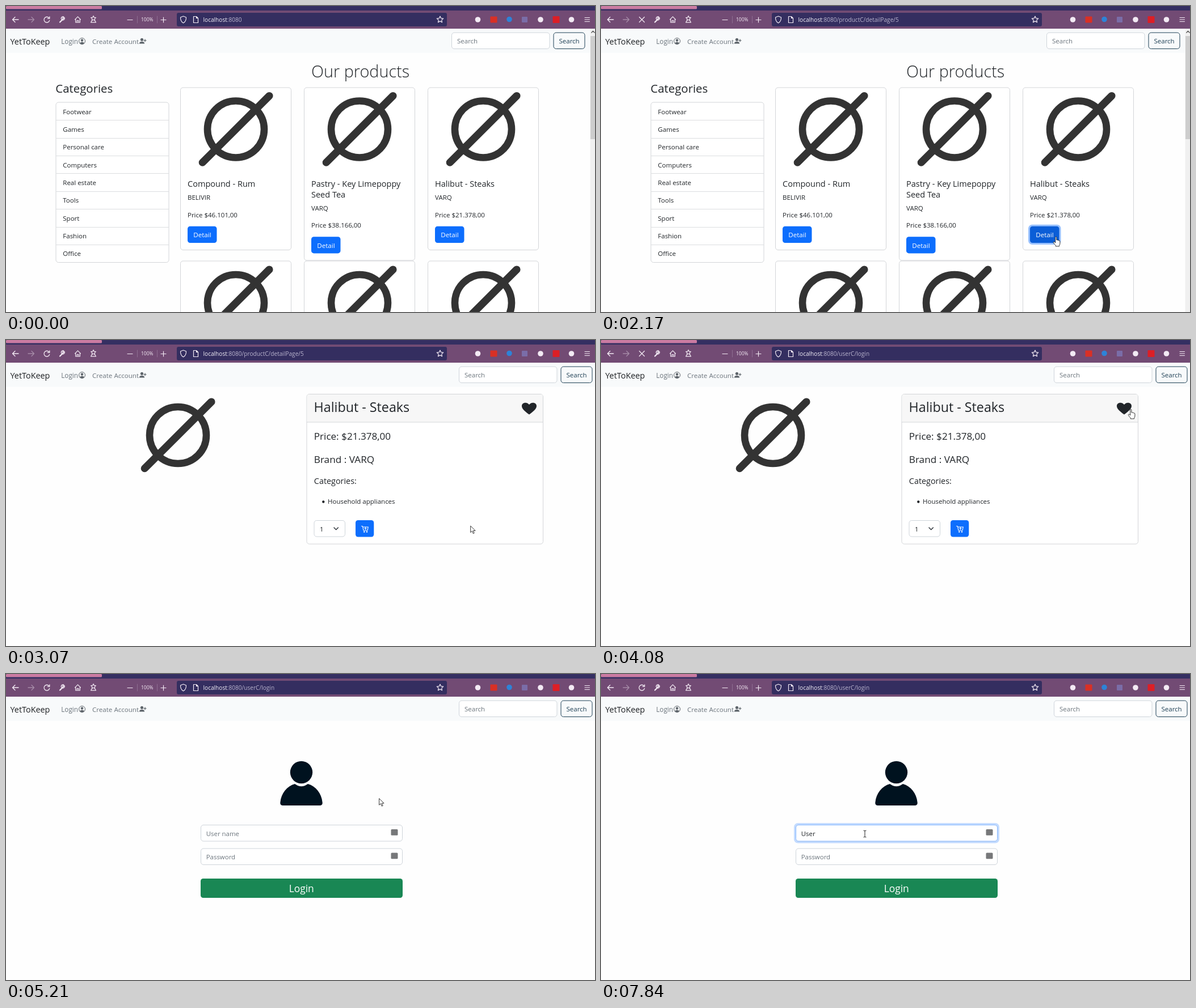
An HTML page that plays this animation: 1038x540 px, repeating every 8000 ms.

```html
<!DOCTYPE html>
<html lang="en">
<head>
<meta charset="utf-8">
<title>Shop walkthrough</title>
<style>
  html, body { margin: 0; width: 100%; height: 100%; overflow: hidden; background: #fefefe; }
  svg { display: block; width: 100%; height: 100%; }
  text { font-family: "Open Sans", "Noto Sans", sans-serif; white-space: pre; }
</style>
</head>
<body>
<svg id="stage" viewBox="0 0 1038 540" xmlns="http://www.w3.org/2000/svg"></svg>
<script>
const LOOP = 8000, INK = '#212529', GREY = '#6c757d', BLUE = '#0d6efd', LINE = '#d3d5d8';
const BRAND = 'YetToKeep', MAKER = 'VARQ';

const text = (x, y, s, size = 11.5, fill = INK, more = '') =>
  `<text x="${x}" y="${y}" font-size="${size}" fill="${fill}" ${more}>${s}</text>`;
const rect = (x, y, w, h, fill, r = 0, more = '') =>
  `<rect x="${x}" y="${y}" width="${w}" height="${h}" rx="${r}" fill="${fill}" ${more}/>`;
const box = (x, y, w, h, fill = '#fff', stroke = LINE, r = 4.5) =>
  rect(x + .5, y + .5, w - 1, h - 1, fill, r, `stroke="${stroke}"`);
const disc = (x, y, r, fill) => `<circle cx="${x}" cy="${y}" r="${r}" fill="${fill}"/>`;
const path = (d, stroke, w = 1.2, more = '') =>
  `<path d="${d}" fill="none" stroke="${stroke}" stroke-width="${w}" stroke-linecap="round" stroke-linejoin="round" ${more}/>`;
const group = (id, body, more = '') => `<g id="${id}" ${more}>${body}</g>`;
const move = (x, y, body) => `<g transform="translate(${x} ${y})">${body}</g>`;

const star = (x, y, r) => 'M' + Array.from({ length: 10 }, (_, i) => {
  const a = -Math.PI / 2 + i * Math.PI / 5, k = i % 2 ? r * .48 : r;
  return (x + k * Math.cos(a)).toFixed(2) + ' ' + (y + k * Math.sin(a)).toFixed(2);
}).join('L') + 'Z';

const emptySet = (x, y) => move(x, y,
  '<circle r="50" fill="none" stroke="#333" stroke-width="12.6"/>' +
  path('M-58.7 58.7L59 -59', '#333', 13.2));

function browser() {
  const c = '#f3eaf4';
  return rect(0, 0, 1038, 8, '#352f62') + rect(0, 0, 169, 5.5, '#cb7ba2', 1.5) +
    group('burst', '<ellipse cx="13" cy="-2" rx="13" ry="8" fill="#5d4a5e"/>') +
    rect(0, 8, 1038, 32, '#724b74') + rect(301, 12, 476, 24, '#342e60', 3) +
    path('M22 24H12M16 19.5L11.5 24L16 28.5', c, 1.3) +
    path('M39 24H49M45 19.5L49.5 24L45 28.5', c, 1.3, 'opacity=".4"') +
    group('reload', path('M75.5 20.8A4.9 4.9 0 1 0 76.7 25.3M76.8 18.8V22.2H73.2', c, 1.3)) +
    group('stop', path('M67.5 19.5L76.5 28.5M76.5 19.5L67.5 28.5', c, 1.3)) +
    path('M95 28.5L100 23.5', c, 2.2) + path('M103 20.5L101 22.5L99.8 21.3L101.8 19.2A3 3 0 1 0 103 20.5', c, 1.4) +
    path('M121.5 23.8L126.5 18.8L131.5 23.8M122.7 23V29H130.3V23M125.2 29V25.5H127.8V29', c) +
    path(star(154, 22, 4.6), c) + path('M149.5 28.8H158.5M151 26.5L149.5 28.8M157 26.5L158.5 28.8', c) +
    path('M214 24.5H223M273 24.5H282M277.5 20V29', c) +
    path('M231.5 18V30M266.5 18V30', '#96779a', .8) +
    text(238, 27.4, '100%', 8.5, c) +
    path('M312.5 18L317.5 20C317.7 25 316 28 312.5 30C309 28 307.300 25 307.500 20Z', c) +
    path('M330.500 18.500H335.500L338.500 21.500V29.500H330.500ZM335.500 18.500V21.500H338.500', c) +
    `<text x="347.5" y="27.8" font-size="10.1" fill="#f4f1f8">localhost<tspan fill="#b9b4cd" id="url"></tspan></text>` +
    path(star(765, 24, 6), c) +
    disc(831.5, 24, 4.8, c) + rect(853.5, 18.5, 12, 11, '#d93025', 1) + disc(887, 23.5, 4.8, '#2d83d8') +
    rect(909, 19, 10, 10, '#7a6da8', 1) + disc(942, 24, 4.8, c) + rect(963.5, 18, 12, 12, '#dc1f26', 1) +
    disc(996.5, 24, 4.8, c) +
    path('M1020 20.500H1028.500M1020 24H1028.500M1020 27.500H1028.500', c, 1.1);
}

function navbar() {
  const search = box(785, 46.5, 173.5, 29.500, '#fff', '#ced4da') + text(795, 66.3, 'Search', 11.5, GREY) +
    box(964.5, 46.5, 56, 29.500, 'none', '#1d3f54') + text(974.5, 66.3, 'Search', 11.5, '#1d3f54');
  return rect(0, 40, 1038, 42.5, '#f8fafb') +
    text(7.5, 68, BRAND, 14.4, '#1c1f22') +
    text(97.3, 66.500, 'Login', 11.7, GREY) + text(152, 66.500, 'Create Account', 11.6, GREY) +
    '<circle cx="134" cy="62" r="5.5" fill="none" stroke="#5f666c"/>' + disc(134, 60.500, 2.2, '#5f666c') +
    '<path d="M129.700 65.500Q134 61.500 138.300 65.500Q134 69.500 129.700 65.500Z" fill="#5f666c"/>' +
    disc(239.500, 59.300, 2.600, '#5f666c') + '<path d="M234.800 66.500Q235 62.700 239.500 62.700Q244 62.700 244.200 66.500Z" fill="#5f666c"/>' +
    path('M243 60.800H247M245 58.800V62.800', '#5f666c') +
    group('search', search);
}

const button = (x, y, id = '') => (id ? group(id + 'Ring', rect(x - 3, y - 3, 57.5, 35.2, '#98c1fe', 7)) : '') +
  rect(x, y, 51.5, 29.2, BLUE, 4.5, id && `id="${id}"`) + text(x + 10.3, y + 19.6, 'Detail', 11.6, '#fff');

function card(x, y, title, maker, price, id) {
  const drop = (title.length - 1) * 18.4, h = 287.5 + drop;
  return box(x, y, 196, h) + emptySet(x + 98, y + 74) +
    title.map((s, i) => text(x + 13, y + 175.800 + i * 18.400, s, 14.500)).join('') +
    text(x + 13, y + 198.7 + drop, maker) + text(x + 13, y + 229.500 + drop, 'Price ' + price) +
    button(x + 13, y + 245.3 + drop, id);
}

function shopPage() {
  const kinds = ['Footwear', 'Games', 'Personal care', 'Computers', 'Real estate', 'Tools', 'Sport', 'Fashion', 'Office'];
  const row = 31.36;
  return text(538, 126, 'Our products', 28.8, INK, 'font-weight="300"') +
    text(87.300, 153, 'Categories', 20.4) + box(87.5, 169.500, 200, 283.500) +
    kinds.map((s, i) => (i ? rect(88, Math.round(170 + i * row), 199, 1, '#dcdee0') : '') +
      text(100.3, 190.500 + i * row, s)).join('') +
    card(307, 143.500, ['Compound - Rum'], 'BELIVIR', '$46.101,00') +
    card(525, 143.500, ['Pastry - Key Limepoppy', 'Seed Tea'], MAKER, '$38.166,00') +
    card(743, 143.500, ['Halibut - Steaks'], MAKER, '$21.378,00', 'pick') +
    [307, 525, 743].map(x => box(x, 449.5, 196, 300) + emptySet(x + 98, 524)).join('') +
    rect(1029.5, 40, 8.5, 500, '#f0f0f0') + rect(1030, 53, 8, 182, '#cdcdcd') +
    path('M1031.800 47L1034.500 44.300L1037.200 47', '#555', 1.3);
}

function detailPage() {
  return emptySet(303, 168) + box(529.5, 95, 417.5, 265.500) +
    '<path d="M530.500 144.500V99.500Q530.500 96 534 96H942.500Q946 96 946 99.500V144.500Z" fill="#f7f7f7"/>' +
    rect(530, 144.500, 416.500, 1, LINE) +
    text(542.500, 127, 'Halibut - Steaks', 23.3) +
    '<path d="M922 131.500C913 125 909 121 909 116.500C909 110 918 108.500 922 114C926 108.500 935 110 935 116.500C935 121 931 125 922 131.500Z" fill="#212529"/>' +
    text(542.800, 176, 'Price: $21.378,00', 17.1) + text(542.800, 216.500, 'Brand : ' + MAKER, 17.2) +
    text(542.800, 254, 'Categories:', 14.4) + disc(559.300, 285.500, 2.2, INK) +
    text(567, 289.300, 'Household appliances') +
    box(542.5, 318, 55.5, 29.500, '#fff', '#ced4da') + text(553, 337.500, '1') +
    path('M578 331L581.700 334.700L585.400 331', '#343a40', 1.5) +
    rect(616, 318, 32.300, 29.500, BLUE, 4.5) +
    path('M626.500 328.500H628.300L630 336H637L638.300 330H629M633.500 330.800V334.300M631.800 332.500H635.200', '#fff', 1.1) +
    disc(631.300, 338.500, 1.2, '#fff') + disc(636, 338.500, 1.2, '#fff');
}

function loginPage() {
  const field = y => box(343, y, 356, 29.500, '#fff', '#ced4da');
  return disc(520.5, 173.5, 19.7, '#00121f') +
    '<path d="M488 232Q483 232 483.300 227C485 210 495 198 509 194Q520.500 202.500 532 194C546 198 556 210 557.700 227Q558 232 553 232Z" fill="#00121f"/>' +
    group('focusRing', rect(340, 263, 362, 35.5, '#c3dbff', 7)) +
    field(266) + field(307.500) + group('focusEdge', box(343, 266, 356, 29.500, '#fff', '#86b7fe')) +
    group('marks', rect(678.500, 274, 12, 10.800, '#77787a', 1.500) + rect(678.500, 315.500, 12, 10.800, '#77787a', 1.500)) +
    text(352.700, 285.800, 'User name', 11.45, GREY, 'id="entry"') +
    rect(353, 274, 1, 15, '#222', 0, 'id="caret"') +
    text(352.700, 327.300, 'Password', 11.45, GREY) +
    rect(343, 361, 356, 34, '#198754', 4.5) + text(520.7, 384.800, 'Login', 17.4, '#fff', 'text-anchor="middle"');
}

function pointers() {
  return group('arrow', '<path d="M.5 .5V12L3.300 9.500L5.100 14L7 13.200L5.200 8.900H9Z" fill="#fff" stroke="#222" stroke-width=".9"/>') +
    group('hand', '<path d="M.700 9V1.500Q.800 .200 1.800 .300Q2.900 .400 2.900 1.500V6Q4.500 5.200 5 6.400Q6.500 5.900 7 7Q8.900 6.700 8.900 8.500V12Q8.900 14 7.600 15.500V17H1.200V15.500Q-1 13.500 -2.700 10.500Q-3 8.900 -1.500 8.900Q-.200 9.200 .700 11Z" fill="#fff" stroke="#222" stroke-width=".9"/>') +
    group('beam', path('M-2 -5.800Q0 -5.800 0 -4.800Q0 -5.800 2 -5.800M0 -5V5M-2 6Q0 6 0 5Q0 6 2 6', '#222', 1));
}

document.getElementById('stage').innerHTML =
  rect(0, 0, 1038, 540, '#fefefe') + browser() + navbar() +
  group('shop', shopPage()) + group('detail', detailPage()) + group('login', loginPage()) +
  group('pointer', pointers());

const ui = {};
document.querySelectorAll('[id]').forEach(el => ui[el.id] = el);

const show = (el, on) => el.setAttribute('display', on ? 'inline' : 'none');
const fade = (el, v) => el.setAttribute('opacity', v);
const within = (t, a, b) => t >= a && t < b;
const ramp = (t, a, b) => Math.max(0, Math.min(1, (t - a) / (b - a)));
const latest = (steps, t) => steps.filter(s => s[0] <= t).pop()[1];

const track = [[590, 978, 518], [760, 936, 486], [1000, 874, 444], [1350, 814, 418], [1440, 812, 416],
  [1640, 800, 407], [2780, 800, 407], [3070, 818, 328], [3300, 870, 232], [3620, 937, 126],
  [3890, 932, 122], [4870, 932, 122], [5080, 800, 165], [5300, 560, 256], [5490, 465, 282]];
const urls = [[0, ''], [2100, '/productC/detailPage/5'], [4080, '/userC/login']];
const typed = [[0, ''], [7040, 'U'], [7370, 'Us'], [7500, 'Use'], [7700, 'User']];
const blink = [[0, 0], [5700, 1], [6240, 0], [6700, 1], [7230, 0], [7370, 1], [7840, 0]];

function pointerAt(t) {
  const i = track.findIndex(k => k[0] > t);
  if (i < 0) return track[track.length - 1].slice(1);
  if (!i) return track[0].slice(1);
  const [a, b] = [track[i - 1], track[i]], p = ramp(t, a[0], b[0]);
  return [a[1] + (b[1] - a[1]) * p, a[2] + (b[2] - a[2]) * p];
}

function draw(t) {
  const page = t < 2240 ? 'shop' : t < 4220 ? 'detail' : 'login';
  ['shop', 'detail', 'login'].forEach(id => show(ui[id], id === page));
  ui.search.setAttribute('transform', `translate(${page === 'shop' ? 0 : 13} 0)`);
  ui.url.textContent = ':8080' + latest(urls, t);

  const loading = within(t, 2100, 2570) || within(t, 4080, 4810);
  show(ui.stop, loading);
  show(ui.reload, !loading);
  fade(ui.stop, within(t, 2240, 2570) || within(t, 4220, 4810) ? .45 : 1);
  fade(ui.reload, within(t, 2570, 2850) || within(t, 4810, 5000) ? .45 : 1);
  show(ui.burst, within(t, 2310, 2500) || within(t, 4400, 4620));

  const [x, y] = pointerAt(t);
  const overButton = page === 'shop' && x < 807.5, overHeart = page === 'detail' && x > 908 && y < 132;
  const shape = overButton || overHeart ? 'hand' : page === 'login' && y > 266 ? 'beam' : 'arrow';
  show(ui.pointer, t >= 590);
  ui.pointer.setAttribute('transform', `translate(${x.toFixed(1)} ${y.toFixed(1)})`);
  ['arrow', 'hand', 'beam'].forEach(id => show(ui[id], id === shape));
  ui.pick.setAttribute('fill', overButton ? '#0b5ed7' : BLUE);
  fade(ui.pickRing, ramp(t, 1850, 2000));

  const focus = ramp(t, 5630, 5790);
  fade(ui.focusRing, focus);
  fade(ui.focusEdge, focus);
  show(ui.marks, t >= 4700);

  const value = latest(typed, t);
  ui.entry.textContent = value || 'User name';
  ui.entry.setAttribute('fill', value ? INK : GREY);
  ui.caret.setAttribute('x', value ? Math.round(352.700 + ui.entry.getComputedTextLength()) : 353);
  show(ui.caret, latest(blink, t));
}

const start = performance.now();
function tick() {
  draw((performance.now() - start) % LOOP);
  requestAnimationFrame(tick);
}
tick();
</script>
</body>
</html>
```
